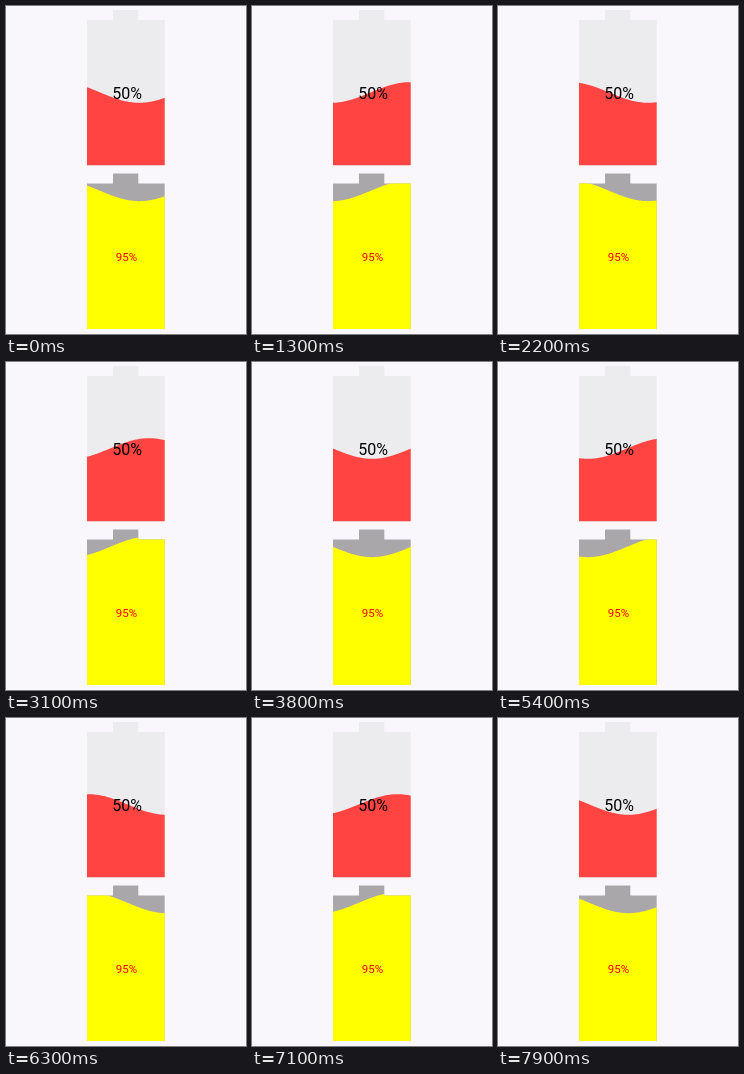
An HTML page for the animation above (8 s loop, 240 px wide and 328 px high).

```html
<!DOCTYPE html>
<html lang="en">
<head>
<meta charset="utf-8">
<title>Battery waves</title>
<style>
  html, body { margin: 0; width: 100%; height: 100%; overflow: hidden; background: #f9f7fc; }
  svg { display: block; width: 240px; height: 328px; }
  text { font-family: Roboto, sans-serif; text-anchor: middle; }
</style>
</head>
<body>
<svg viewBox="0 0 240 328">
  <defs>
    <path id="shell" d="M81 14H107V4H132.3V14H158.7V159.3H81Z"/>
    <clipPath id="clip"><use href="#shell"/></clipPath>
  </defs>
  <g>
    <use href="#shell" fill="#ecebee"/>
    <path class="wave" data-level="0.5" fill="#ff4442" clip-path="url(#clip)"/>
    <text x="121" y="93" font-size="16">50%</text>
  </g>
  <g transform="translate(0 163.6)">
    <use href="#shell" fill="#a9a7aa"/>
    <path class="wave" data-level="0.95" fill="#ff0" clip-path="url(#clip)"/>
    <text x="120.5" y="91.6" font-size="11.5" fill="#f00">95%</text>
  </g>
</svg>
<script>
  const LOOP = 8000, STEP = 100, PERIOD = 1984, START = 0.585;
  const LEFT = 81, RIGHT = 159, TOP = 14, HEIGHT = 145;
  const AMPLITUDE = 10.3, WAVELENGTH = 156;
  const waves = document.querySelectorAll('.wave');

  function wavePath(level, turn) {
    const middle = TOP + HEIGHT * (1 - level);
    let d = `M${LEFT - 1} 160`;
    for (let x = LEFT - 1; x <= RIGHT + 1; x++) {
      const angle = 2 * Math.PI * (turn - (x - LEFT) / WAVELENGTH);
      d += `L${x} ${(middle + AMPLITUDE * Math.sin(angle)).toFixed(2)}`;
    }
    return d + `V160Z`;
  }

  function draw(now) {
    const time = Math.floor((now % LOOP) / STEP) * STEP;
    const turn = START + time / PERIOD;
    for (const wave of waves) wave.setAttribute('d', wavePath(+wave.dataset.level, turn));
  }

  const begin = performance.now();
  function tick() {
    draw(performance.now() - begin);
    requestAnimationFrame(tick);
  }
  tick();
</script>
</body>
</html>
```
